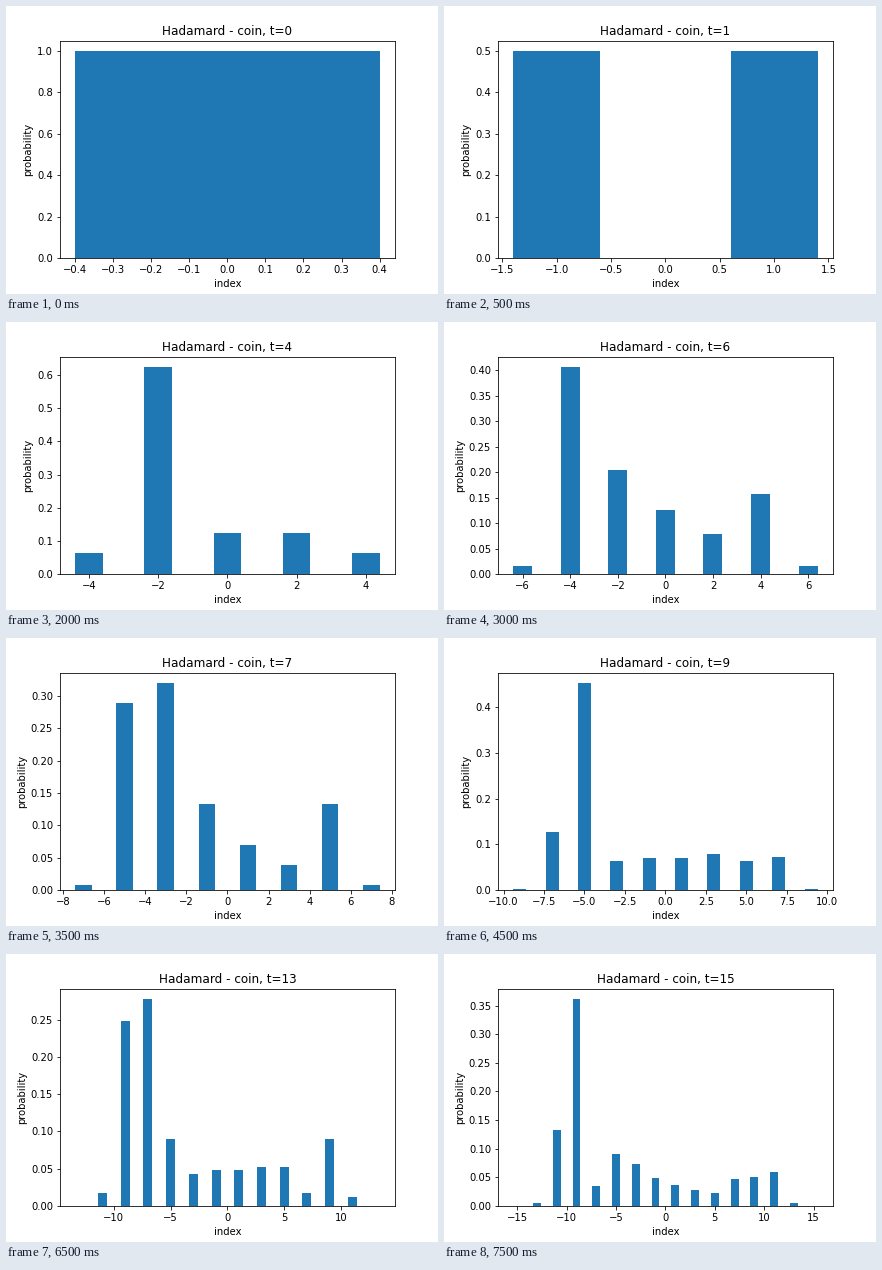
Write a matplotlib script that moves like this. It is 432x288 px and loops after 8000 ms.

```python
import numpy as np
import matplotlib.pyplot as plt
from matplotlib.animation import FuncAnimation

STEPS = 16
INTERVAL = 500


def walk(steps):
    """Probabilities of a Hadamard walk at positions -steps, -steps+2, ..., steps."""
    left, right = np.array([1.0]), np.array([0.0])
    for _ in range(steps):
        plus = (left + right) / np.sqrt(2)
        minus = (left - right) / np.sqrt(2)
        left, right = np.append(plus, 0), np.append(0, minus)
    return left**2 + right**2


plt.rcParams["font.family"] = "DejaVu Sans"
plt.rcParams["font.size"] = 10

fig, ax = plt.subplots(figsize=(6, 4), dpi=72, facecolor="white")
fig.subplots_adjust(left=0.125, right=0.9, bottom=0.125, top=0.88)


def draw(t):
    ax.clear()
    ax.bar(np.arange(-t, t + 1, 2), walk(t), width=0.8, color="#1f77b4")
    ax.set_title(f"Hadamard - coin, t={t}")
    ax.set_xlabel("index")
    ax.set_ylabel("probability")
    return ax.patches


anim = FuncAnimation(fig, draw, frames=STEPS, init_func=lambda: draw(0),
                     interval=INTERVAL, repeat=True, repeat_delay=0, blit=False)
plt.show()
```
